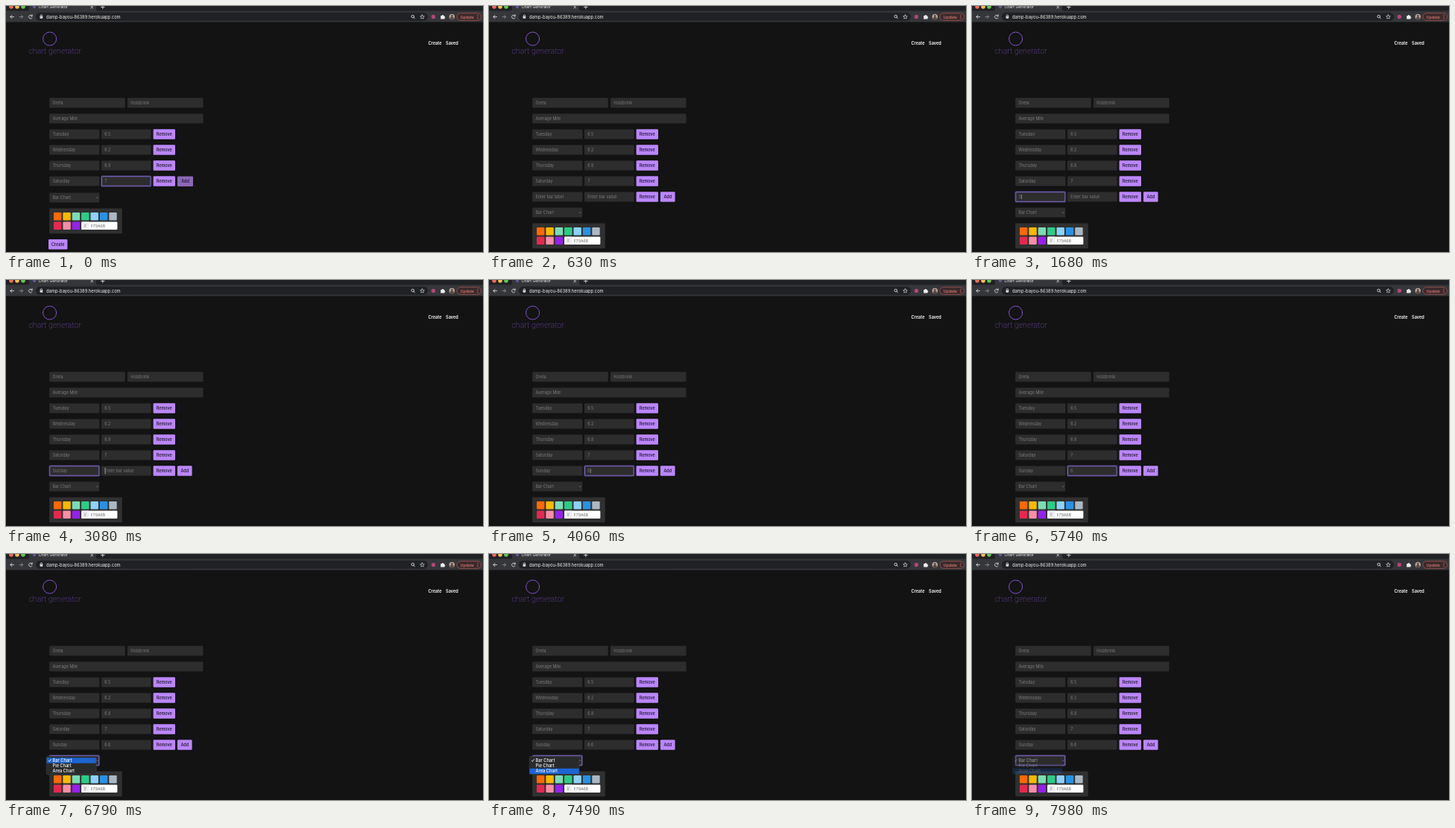
An HTML page that plays this animation: 640x330 px, repeating every 8000 ms.

```html
<!DOCTYPE html>
<html lang="en">
<head>
<meta charset="utf-8">
<title>Chart Generator</title>
<style>
  html, body { margin: 0; width: 100%; height: 100%; overflow: hidden; background: #131313; }
  svg { display: block; width: 100vw; height: 100vh; }
  text { font: 5.5px Inter, Roboto, sans-serif; fill: #7a7a7a; white-space: pre; }
  .field { fill: #2d2d2d; }
  .button { fill: #bb86fc; }
  .button.hover { fill: #8d68b8; }
  .dark { fill: #1b1424; font-weight: 500; }
  .light { fill: #f1f1f1; }
  .nav { fill: #fff; font-size: 5.6px; font-weight: 600; }
  .icon { fill: none; stroke: #d5d6d9; stroke-width: .9; stroke-linecap: round; stroke-linejoin: round; }
  .wordmark { font: 200 10.6px Roboto, "Open Sans", sans-serif; font-stretch: 75%; fill: #8956d6; }
  .ring { fill: none; stroke: #7760b8; stroke-width: 1.3; }
  .glow { fill: none; stroke: #4a3d70; stroke-width: .7; }
  .menu-item { fill: #fff; font-size: 5.7px; font-weight: 500; }
</style>
</head>
<body>
<svg id="stage" viewBox="0 0 640 330" preserveAspectRatio="none">
  <g id="browser">
    <rect width="640" height="8" fill="#202124"/>
    <path d="M28 7Q31 7 31 4V0H121V4Q121 7 124 7Z" fill="#35363a"/>
    <rect y="6.5" width="640" height="15" fill="#35363a"/>
    <rect x="40" y="8.8" width="526" height="11" rx="5.5" fill="#202124"/>
    <circle cx="7" cy="1" r="2.8" fill="#ed6a5e"/>
    <circle cx="15" cy="1" r="2.8" fill="#f4bf4f"/>
    <circle cx="23" cy="1" r="2.8" fill="#61c554"/>
    <circle cx="38" cy="1.3" r="2" fill="#68549a"/>
    <text class="light" x="43.5" y="3.3" style="font-size:5.2px">Chart Generator</text>
    <g class="icon">
      <path d="M113.7 0L116.7 3M116.7 0L113.7 3M127.5 1.5h4.6M129.8 -.8v4.6"/>
      <path d="M10.5 14.5H6M8 12.3L5.8 14.5L8 16.7"/>
      <path d="M18 14.5h4.5M20.5 12.3l2.2 2.2l-2.2 2.2" stroke="#888b90"/>
      <path d="M35 13.2A2.4 2.4 0 1 0 35 15.8M35.2 11.8v1.8h-1.8"/>
      <path d="M46.2 14v-1a1.2 1.2 0 0 1 2.4 0v1"/>
      <circle cx="545.7" cy="14" r="1.8"/><path d="M547 15.4l1.4 1.5"/>
      <path d="M558.5 11.7l.8 1.8l2 .2l-1.5 1.4l.4 2l-1.7-1l-1.7 1l.4-2l-1.5-1.4l2-.2z" stroke-width=".7"/>
    </g>
    <rect x="45.6" y="13.8" width="3.6" height="3" rx=".4" fill="#d5d6d9"/>
    <text class="light" x="54" y="16.6" style="font-size:5.8px">damp-bayou-86389.herokuapp.com</text>
    <circle cx="573.4" cy="14.5" r="2.7" fill="#b04679"/>
    <path d="M583.2 13h1.6a1.1 1.1 0 0 1 2.2 0h1.3v1.5a1 1 0 0 1 0 2v1h-5.1z" fill="#eceef0"/>
    <circle cx="598.3" cy="14.5" r="3.7" fill="#b8a49a"/>
    <circle cx="598.3" cy="13.5" r="1.4" fill="#59463f"/>
    <path d="M595.7 17.1a2.6 2.3 0 0 1 5.2 0a3.7 3.7 0 0 1-5.2 0z" fill="#59463f"/>
    <rect x="605" y="9.7" width="32.5" height="9.6" rx="4.8" fill="#3b292b" stroke="#a9524e" stroke-width=".8"/>
    <text x="609.5" y="16.5" style="fill:#f28b82;font-size:5.4px">Update</text>
    <g fill="#f28b82"><circle cx="633" cy="12.3" r=".6"/><circle cx="633" cy="14.5" r=".6"/><circle cx="633" cy="16.7" r=".6"/></g>
  </g>
  <circle cx="58.6" cy="44" r="9" fill="none" stroke="#8150cc"/>
  <text class="wordmark" x="30.5" y="64">chart generator</text>
  <text class="nav" x="566.5" y="52.2">Create</text>
  <text class="nav" x="590" y="52.2">Saved</text>
</svg>
<script>
const LOOP = 8000;
const ADD = 420, LABEL_FOCUS = 1260, VALUE_FOCUS = 3220;
const MENU_OPEN = 6720, MENU_CLOSE = 7770;
const LABEL_KEYS = [1540, 1750, 1890, 2030, 2240, 2380];
const VALUE_KEYS = [3950, 4900, 6020];
const SWATCHES = ['#ff6900', '#fcb900', '#7bdcb5', '#2dcc86', '#8ed1fc',
  '#2991e3', '#abb8c3', '#e22a4f', '#f78da7', '#9422ea'];

const stage = document.getElementById('stage');

function add(parent, tag, attrs, content = '') {
  const node = document.createElementNS('http://www.w3.org/2000/svg', tag);
  for (const key in attrs) node.setAttribute(key, attrs[key]);
  node.textContent = content;
  return parent.appendChild(node);
}
const group = (parent = stage) => add(parent, 'g', {});
const box = (parent, x, y, width, height, attrs) =>
  add(parent, 'rect', { x, y, width, height, rx: 1.2, ...attrs });
const label = (parent, x, y, content, cls = '') =>
  add(parent, 'text', { x, y: y + 2, class: cls }, content);

function field(parent, x, y, width, content) {
  box(parent, x, y - 6.6, width, 13.2, { class: 'field' });
  return label(parent, x + 4.3, y, content);
}
function button(parent, x, y, width, content) {
  const rect = box(parent, x, y - 6.7, width, 13.4, { class: 'button' });
  const text = label(parent, x + width / 2, y, content, 'dark');
  text.setAttribute('text-anchor', 'middle');
  return rect;
}
function row(parent, y, name, value) {
  const texts = [field(parent, 58.2, y, 67.2, name), field(parent, 128, y, 66.6, value)];
  button(parent, 197.6, y, 29.4, 'Remove');
  return texts;
}
function focusRing(x, y, width) {
  const ring = group();
  box(ring, x, y - 6.4, width, 12.8, { class: 'ring' });
  box(ring, x - .9, y - 7.3, width + 1.8, 14.6, { class: 'glow' });
  return ring;
}
const show = (node, visible) => { node.style.display = visible ? '' : 'none'; };

// Form
field(stage, 58.2, 129.8, 101.6, 'Greta');
field(stage, 163, 129.8, 101.6, 'Holzbrink');
field(stage, 58.2, 151, 206.4, 'Average Mile');
[['Tuesday', '6.5'], ['Wednesday', '6.2'], ['Thursday', '6.8'], ['Saturday', '7']]
  .forEach(([name, value], i) => row(stage, 172 + 21 * i, name, value));
const oldAdd = group();
button(oldAdd, 230, 235.3, 21, 'Add').classList.add('hover');
const newRow = group();
const [nameText, valueText] = row(newRow, 256, '', '');
button(newRow, 230, 256, 19.6, 'Add');

// Chart type, colour picker and submit button, which move down together
const lower = group();
field(lower, 58.2, 257, 67, 'Bar Chart');
add(lower, 'path', { d: 'M121 256.4l1.4 1.4l1.4-1.4', fill: 'none', stroke: '#8a8a8a', 'stroke-width': .7 });
box(lower, 58.2, 271.6, 97.6, 33.6, { fill: '#303030' });
SWATCHES.forEach((fill, i) =>
  box(lower, 64 + 12.38 * (i % 7), 277 + 12.5 * Math.floor(i / 7), 10.4, 10.4, { fill }));
box(lower, 101.2, 289.5, 48.2, 10.4, { fill: '#fff' });
box(lower, 101.2, 289.5, 10.4, 10.4, { fill: '#eef0f2' });
label(lower, 104.6, 294.7, '#').style.fill = '#98a1a4';
label(lower, 113.8, 294.7, 'F79A6B').style.cssText = 'fill:#666;font-size:5.2px';
button(lower, 57, 319.8, 25.4, 'Create');

// Focus, caret and pointer
const rings = {
  previous: focusRing(128.5, 235, 65.6),
  name: focusRing(58.7, 256, 66.2),
  value: focusRing(128.5, 256, 65.6),
  select: focusRing(58.7, 277, 66)
};
const caret = box(stage, 0, 253, .6, 6, { rx: 0, fill: '#b5b5b5' });
const beam = add(stage, 'path', { d: 'M132.2 252.6h1.8M133.1 252.6v6.8M132.2 259.4h1.8',
  fill: 'none', stroke: '#aaa', 'stroke-width': .6 });

// Drop-down menu
const menu = group();
box(menu, 54.3, 271.6, 66.8, 24.2, { fill: '#292a2c', stroke: '#48494b', 'stroke-width': .5 });
const highlight = box(menu, 54.6, 0, 66.2, 7.3, { rx: 0, fill: '#1c65d2' });
['Bar Chart', 'Pie Chart', 'Area Chart'].forEach((name, i) =>
  label(menu, 62.6, 277 + 7.2 * i, name, 'menu-item'));
add(menu, 'path', { d: 'M57.2 277l1.2 1.5l2.2-3.4', fill: 'none', stroke: '#fff', 'stroke-width': .8 });

function typed(node, content, keys, focusedAt, placeholder, t) {
  const past = keys.filter(time => time <= t);
  const value = content.slice(0, past.length);
  node.textContent = value || placeholder;
  return {
    width: value ? node.getComputedTextLength() : 0,
    since: past.length ? past[past.length - 1] : focusedAt
  };
}

function draw(t) {
  const added = t >= ADD;
  show(oldAdd, !added);
  show(newRow, added);
  lower.setAttribute('transform', `translate(0 ${added ? 20 : 0})`);

  const name = typed(nameText, 'Sunday', LABEL_KEYS, LABEL_FOCUS, 'Enter bar label', t);
  const value = typed(valueText, '6.6', VALUE_KEYS, VALUE_FOCUS, 'Enter bar value', t);
  const onName = t >= LABEL_FOCUS && t < VALUE_FOCUS;
  const onValue = t >= VALUE_FOCUS && t < MENU_OPEN;
  show(rings.previous, !added);
  show(rings.name, onName);
  show(rings.value, onValue);
  show(rings.select, t >= MENU_OPEN);

  const active = onName ? name : value;
  show(caret, (onName || onValue) && (t - active.since) % 1000 < 500);
  caret.setAttribute('x', (onName ? 62.7 : 132.5) + active.width);
  show(beam, t >= 2950 && t < VALUE_FOCUS);

  show(menu, t >= MENU_OPEN);
  menu.setAttribute('opacity', Math.min(1, Math.max(0, (MENU_CLOSE + 280 - t) / 280)));
  const hovered = t < 7000 ? 0 : t < 7280 ? 1 : 2;
  highlight.setAttribute('y', 273.3 + 7.2 * hovered);
}

function tick() {
  draw(performance.now() % LOOP);
  requestAnimationFrame(tick);
}
tick();
</script>
</body>
</html>
```
